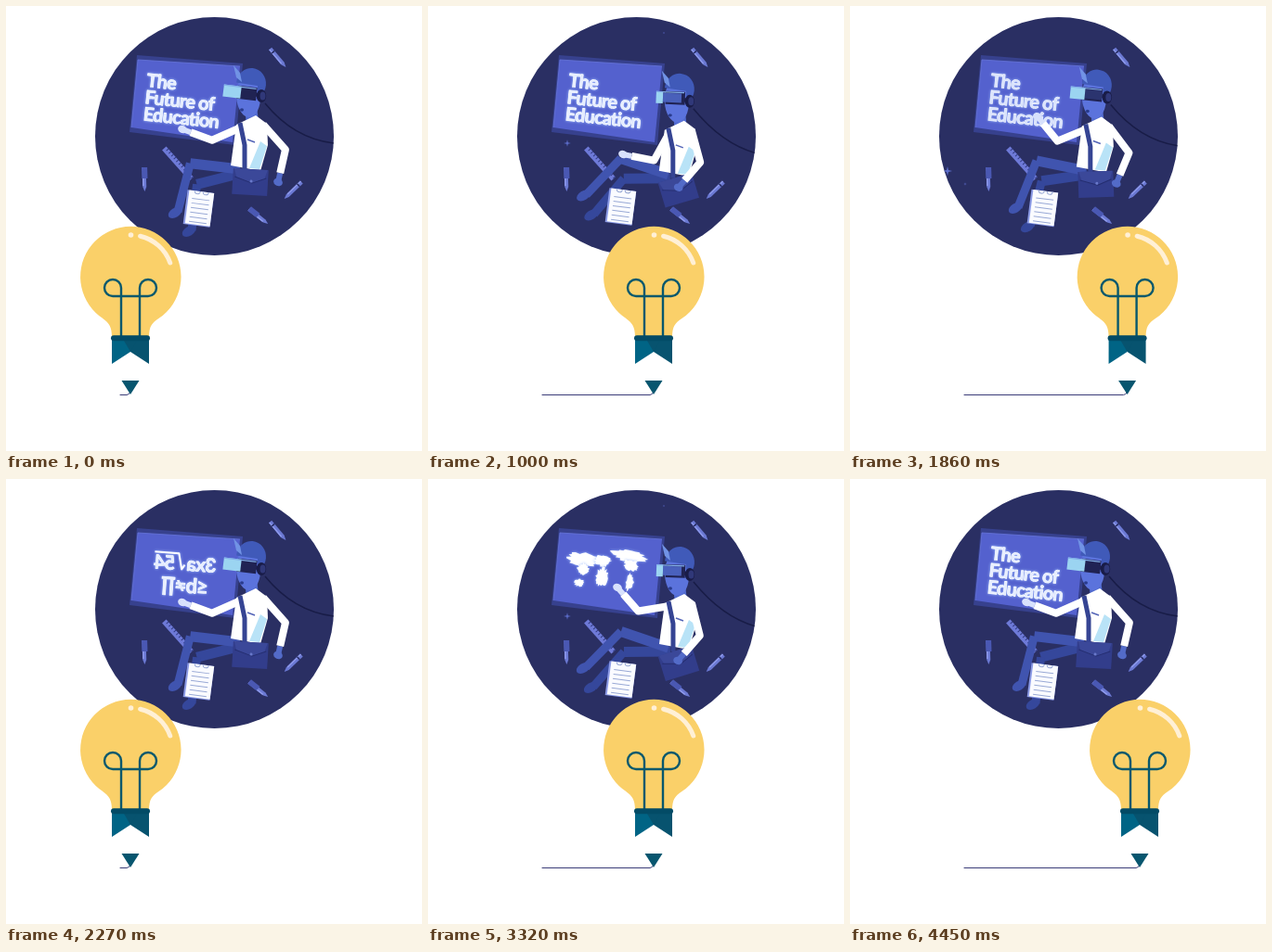
Animation, 448 px wide and 480 px high, one loop 4490 ms. Source, as an HTML page with a canvas:

```html
<!DOCTYPE html>
<html lang="en">
<head>
<meta charset="utf-8">
<title>The Future of Education</title>
<style>
html, body { margin: 0; width: 100%; height: 100%; overflow: hidden; background: #fff; }
canvas { display: block; }
</style>
</head>
<body>
<canvas id="stage" width="448" height="480"></canvas>
<script>
const c = document.getElementById('stage').getContext('2d');
const LOOP = 4490, CYCLE = LOOP / 2, BEAT = CYCLE / 5;
const STOPS = [134, 171, 208, 243, 277.5, 312];
const clamp = v => Math.max(0, Math.min(1, v));
const ease = v => (1 - Math.cos(Math.PI * clamp(v))) / 2;
const mix = (a, b, k) => a + (b - a) * k;
// Rises to 1 after "from" and is back at 0 by "to".
const during = (t, from, to, fade) => Math.min(ease((t - from) / fade), ease((to - t) / fade));

function trace(p) {
  c.beginPath();
  for (let i = 0; i < p.length; i += 2) c.lineTo(p[i], p[i + 1]);
}
function shape(color, ...p) { trace(p); c.fillStyle = color; c.fill(); }
function stroke(color, width) { c.strokeStyle = color; c.lineWidth = width; c.stroke(); }
function line(color, width, ...p) { trace(p); stroke(color, width); }
function box(color, x, y, w, h) { c.fillStyle = color; c.fillRect(x, y, w, h); }
function dot(color, x, y, rx, ry = rx, turn = 0) {
  c.beginPath();
  c.ellipse(x, y, rx, ry, turn, 0, 7);
  c.fillStyle = color;
  c.fill();
}
function at(x, y, turn, draw) {
  c.save();
  c.translate(x, y);
  c.rotate(turn);
  draw();
  c.restore();
}

// Two equal bones from a to b; side picks the way the joint bends.
function joint(a, b, bone, side) {
  const dx = b[0] - a[0], dy = b[1] - a[1], d = Math.hypot(dx, dy);
  const h = side * Math.sqrt(Math.max(0, bone * bone - d * d / 4)) / d;
  return [a[0] + dx / 2 - dy * h, a[1] + dy / 2 + dx * h];
}

function write(text, x, y, size) {
  c.font = `bold ${size}px Lato, "DejaVu Sans", sans-serif`;
  c.letterSpacing = '-0.8px';
  c.fillText(text, x, y);
  c.strokeText(text, x, y);
}
function title() {
  at(151, 87, .105, () =>
    ['The', 'Future of', 'Education'].forEach((s, i) => write(s, 0, i * 18.2, 20)));
}
function formulas() {
  at(226, 101, .07, () => {
    c.scale(-1, 1);
    write('3xa', 0, 0, 21);
    write('54', 44, 0, 21);
    write('≤b≠∏', 7, 24, 22);
    line('#fff', 2, 34, -6, 37, -1, 41, -18, 67, -18);
  });
}
function worldMap() {
  let seed = 7;
  const random = () => (seed = seed * 16807 % 2147483647) / 2147483647;
  const land = (x, y, rx, ry, turn = 0) => at(x, y, turn, () => {
    const p = [];
    for (let a = 0; a < 6.28; a += .2) {
      const r = .75 + random() * .45;
      p.push(Math.cos(a) * rx * r, Math.sin(a) * ry * r);
    }
    shape('#fff', ...p);
  });
  land(167, 87, 17, 7, .15);   // Asia
  land(188, 88, 9, 6);         // Europe
  land(167, 97, 6, 6);
  land(187, 106, 6, 11, .15);  // Africa
  land(163, 112, 5, 4);        // Australia
  land(217, 83, 19, 6, .2);    // North America
  land(219, 93, 8, 6, .6);
  land(217, 111, 4, 9, .2);    // South America
}

function board(t) {
  shape('#37418e', 141, 53, 255, 62, 247, 150, 133, 136);
  shape('#5461ce', 142, 58, 252, 65, 244, 147, 135, 131);
  line('#6875da', .8, 135, 131, 142, 58, 252, 65);
  const show = (from, to, draw) => {
    c.save();
    c.globalAlpha = during(t, from, to, 120);
    c.fillStyle = c.strokeStyle = '#fff';
    c.lineWidth = .7;
    c.shadowColor = '#9fbcff';
    c.shadowBlur = 3;
    draw();
    c.restore();
  };
  show(-200, 1950, title);
  show(1900, 2950, formulas);
  show(2900, 4350, worldMap);
  show(4310, 5000, title);
}

function pencil(x, y, turn, pen) {
  at(x, y, turn, () => {
    shape('#6b79d3', -2, -13, 2, -13, 2, 8, 0, 13, -2, 8);
    box('#8f9bed', -2, -13, 1.5, 20);
    box('#252b61', -2, -9, 4, 1.5);
    if (pen) box('#4a58b3', -2.5, -13, 6, 12);
  });
}
function ruler() {
  at(185, 170, -.73, () => {
    box('#6e7ad8', -3, -22, 6, 44);
    for (let y = -19; y < 22; y += 4) box('#313b83', 0, y, 3, 1);
  });
}
function clipboard(y) {
  at(208, y, .13, () => {
    box('#8c9be6', -15, -18, 29, 37);
    box('#fafbff', -13, -18, 27, 36);
    for (let row = -10; row < 17; row += 5) box('#99a9d5', -9, row, 19, 1);
    for (const x of [-4, 5]) {
      c.beginPath();
      c.arc(x, -18, 3, 0, Math.PI);
      stroke('#99a9d5', 1);
    }
  });
}
function sparkle(x, y, size, peak, phase) {
  const s = size * ease(1 - Math.abs(phase - peak) / 300);
  c.beginPath();
  for (let i = 0; i < 8; i++) {
    const r = i % 2 ? s * .28 : s, a = i * Math.PI / 4;
    c.lineTo(x + r * Math.cos(a), y + r * Math.sin(a));
  }
  c.fillStyle = '#5c6dcb';
  c.fill();
}

function leg(color, hip, foot, bone) {
  const knee = joint(hip, foot, bone, 1);
  line(color, 11, ...hip, ...knee);
  line(color, 9, ...knee, ...foot);
  dot(color, foot[0] - 3, foot[1] + 1, 8, 5, -.55);
}
function arm(skin, shoulder, hand, bone, side) {
  const elbow = joint(shoulder, hand, bone, side);
  const cuff = elbow.map((v, i) => mix(v, hand[i], .72));
  line(skin, 6, ...cuff, ...hand);
  line('#fff', 8, ...shoulder, ...elbow, ...cuff);
  dot(skin, ...hand, 5, 4, .4);
}

function head(lean) {
  shape('#526bcf', 257, 105, 270, 106, 272, 126, 259, 132);
  dot('#5b73dc', 261, 97, 13, 23, -.05);
  c.beginPath();
  c.ellipse(264, 84, 16, 17, .1, Math.PI, .9);
  c.lineTo(271, 100);
  c.lineTo(271, 86);
  c.fillStyle = '#405ab9';
  c.fill();
  shape('#7193e5', 245, 64, 252, 72, 254, 82, 248, 77);
  dot('#293b8d', 254, 112, 2, 1.7);

  const reach = mix(17, 12, lean), glass = mix(2, -5, lean);
  line('#1b1d4c', 4, 262, 94, 276, 97);
  at(251, 93, mix(.12, .04, lean), () => {
    box('#202353', -2, -7, 21, 14);
    c.globalAlpha = lean;
    box('#4b62be', glass, -5, 20, 10);
    c.globalAlpha = 1;
    box('#9bd4f1', -reach, -6.5, reach + glass, 13);
    box('#82afe9', -reach, -6.5, reach + 18, 1.2);
  });
  dot('#191c48', 275, 97, 5.2, 7);
  dot('#303879', 276.5, 97, 3, 4.5);
}
function torso() {
  shape('#fff', 248, 128, 269, 118, 281, 127, 282, 150, 274, 178, 242, 172);
  shape('#b9e3f7', 274, 146, 281, 151, 273, 176, 262, 175);
  line('#5364b7', 1.5, 260, 144, 268, 147);
}
function bag() {
  box('#323d8b', -19, -14, 38, 28);
  shape('#3b4899', -18, -14, 18, -14, 15, -4, 2, 1, -15, -4);
  line('#242d70', 1, -17, -5, 2, 1, 17, -5);
  dot('#6878ca', 1, -1, 1.5);
}

function person(t, lean) {
  const sx = lean * 7, sy = lean * 6;
  const down = during(t, 150, 1450, 450);
  const up = during(t, 1050, 2200, 450) + during(t, 2350, 4430, 380);

  c.beginPath();
  c.moveTo(279 + sx, 105 + sy);
  c.quadraticCurveTo(310 + sx, 143 + sy, 353, 148 + lean * 11);
  stroke('#181c47', 1.5);

  leg('#35479b', [254 + sx, 180 + sy], [mix(200, 178, lean), mix(242, 224, lean)], 50);
  leg('#4054af', [252 + sx, 176 + sy], [mix(185, 170, lean), mix(222, 203, lean)], 54);
  clipboard(218 - lean * 2);
  at(sx, sy, 0, () => {
    head(lean);
    torso();
  });
  arm('#d8e1fc', [253 + sx, 131 + sy],
    [190 + up * 14 + down * 20, 133 - up * 16 + down * 27], 34, -1);
  at(sx, sy, 0, () => {
    line('#354493', 5, 252, 126, 257, 150, 257, 180);
    at(263, 190 + lean * 3, mix(.06, -.3, lean), bag);
  });
  arm('#536bc8', [277 + sx, 128 + sy], [mix(293, 269, lean), mix(190, 196, lean)], 36, -1);
}

function scene(t, phase) {
  c.save();
  c.beginPath();
  c.arc(224.5, 140.5, 128.5, 0, 7);
  c.clip();
  box('#2a2f63', 90, 0, 270, 280);

  sparkle(150, 148, 4, 1040, phase);
  sparkle(254, 29, 1.4, 1040, phase);
  sparkle(241, 227, 4.5, 1500, phase);
  sparkle(147, 221, 2.5, 1500, phase);
  sparkle(105, 178, 5.5, 1810, phase);
  sparkle(124, 192, 2, 1810, phase);

  board(t);
  pencil(293, 56, -.7);
  pencil(309, 199, .8);
  pencil(149, 187, -.03, true);
  pencil(272, 227, -.9, true);
  ruler();
  person(t, ease(1 - Math.abs(phase * 2 / CYCLE - 1)));
  c.restore();
}

function bulb(x) {
  c.lineCap = 'round';
  c.beginPath();
  c.moveTo(123, 419.5);
  c.lineTo(x - 4, 419.5);
  c.quadraticCurveTo(x - 1.5, 419.5, x, 416);
  stroke('#3b3d78', 1);

  at(x, 0, 0, () => {
    c.beginPath();
    c.arc(.3, 292, 54.2, 2.15, .99);
    c.bezierCurveTo(23, 342, 20, 346, 20, 357);
    c.lineTo(-20, 357);
    c.bezierCurveTo(-20, 346, -23, 342, -29.6, 337.3);
    c.fillStyle = '#fad069';
    c.fill();

    c.beginPath();
    c.arc(.3, 292, 45, -1.34, -.34);
    stroke('#fff0d6', 5);
    dot('#fff0d6', .5, 247, 2.8);

    c.beginPath();
    c.moveTo(-10, 356);
    c.arc(-19, 304, 9, 0, Math.PI / 2, true);
    c.arc(19, 304, 9, Math.PI / 2, Math.PI, true);
    c.lineTo(10, 356);
    stroke('#07586d', 2.4);

    shape('#006485', -20, 359, 0, 359, 0, 373, -20, 386);
    shape('#07536f', 0, 359, 20, 359, 20, 386, 0, 373);
    shape('#07536f', -7, 361, 7, 361, 0, 373);
    line('#034b66', 6, -18, 358.3, 18, 358.3);
    shape('#07566f', -9.5, 404, 9.5, 404, 0, 419);
  });
  c.lineCap = 'butt';
}

function frame(now) {
  const t = now % LOOP, phase = t % CYCLE;
  const beat = Math.floor(phase / BEAT);
  const hop = ease((phase - beat * BEAT - 25) / 70);
  c.clearRect(0, 0, 448, 480);
  c.lineJoin = 'round';
  scene(t, phase);
  bulb(mix(STOPS[beat], STOPS[beat + 1], hop));
  requestAnimationFrame(frame);
}
requestAnimationFrame(frame);
</script>
</body>
</html>
```
